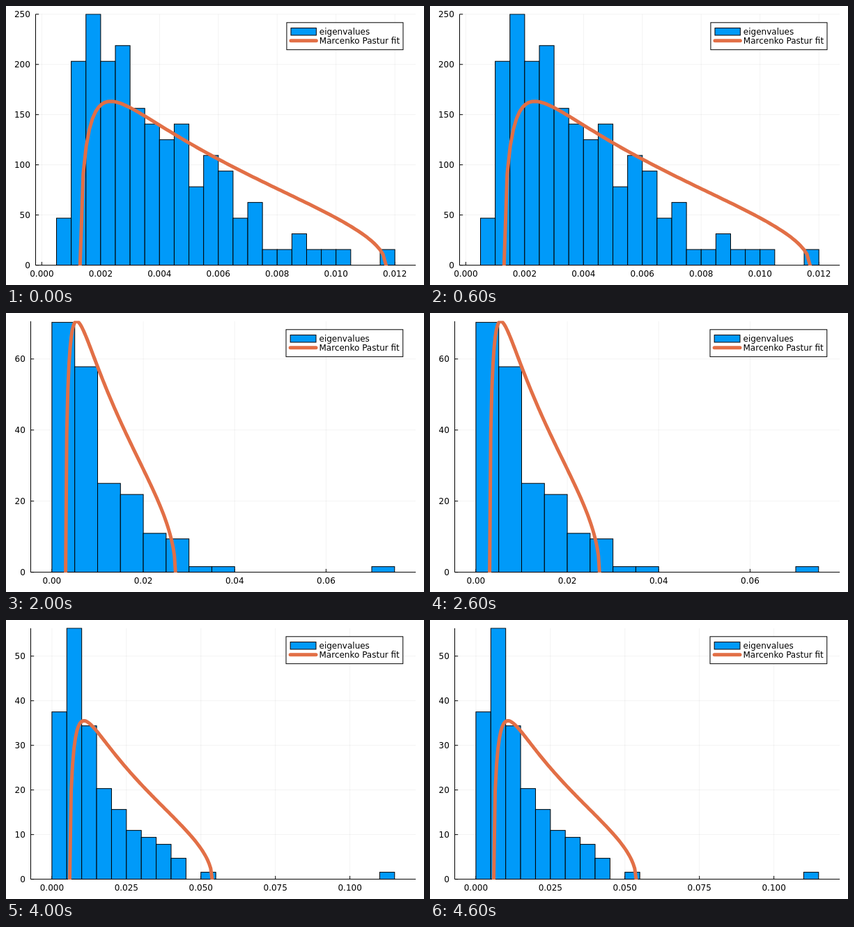
Write an HTML page that moves like this. It is 600 px wide and 400 px high and loops after 5000 ms.

```html
<!DOCTYPE html>
<html lang="en">
<head>
<meta charset="utf-8">
<title>Eigenvalue histograms</title>
<style>
  html, body { margin: 0; width: 100%; height: 100%; overflow: hidden; background: #fff; }
  svg { display: block; width: 600px; height: 400px; font: 12px "DejaVu Sans", sans-serif; }
</style>
</head>
<body>
<svg id="stage" viewBox="0 0 600 400"></svg>
<script>
const HOLD = 1000, SAMPLES = 128;
const TOP = 11.81, BOTTOM = 371.61, RIGHT = 588.19;
const BLUE = '#009af9', ORANGE = '#e26f46';

// counts are per bin, beginning at `start`; `variance` scales the fitted density
const charts = [
  { left: 42.5, start: 0.0005, bin: 0.0005, variance: 0.0052, xStep: 0.002, digits: 3, yStep: 50,
    counts: [3, 13, 16, 13, 14, 10, 9, 8, 9, 5, 7, 6, 3, 4, 1, 1, 2, 1, 1, 1, 0, 0, 1] },
  { left: 42.2, start: 0, bin: 0.002, variance: 0.00816, xStep: 0.01, digits: 2, yStep: 25,
    counts: [16, 32, 24, 14, 9, 8, 7, 4, 5, 3, 3, 1, 0, 0, 1, 0, 0, 0, 0, 0, 0, 0, 1] },
  { left: 35.5, start: 0, bin: 0.005, variance: 0.01202, xStep: 0.02, digits: 2, yStep: 20,
    counts: [45, 37, 16, 14, 7, 6, 1, 1, 0, 0, 0, 0, 0, 0, 1] },
  { left: 35.5, start: 0, bin: 0.005, variance: 0.016, xStep: 0.025, digits: 3, yStep: 10,
    counts: [34, 36, 20, 12, 10, 6, 5, 3, 0, 1, 0, 0, 0, 0, 0, 0, 0, 0, 1] },
  { left: 35.5, start: 0, bin: 0.005, variance: 0.0239, xStep: 0.025, digits: 3, yStep: 10,
    counts: [24, 36, 22, 13, 10, 7, 6, 5, 3, 0, 1, 0, 0, 0, 0, 0, 0, 0, 0, 0, 0, 0, 1] },
];

const line = (x1, y1, x2, y2, attrs = 'stroke="#000"') =>
  `<line x1="${x1}" y1="${y1}" x2="${x2}" y2="${y2}" ${attrs}/>`;
const box = (x, y, w, h, fill) =>
  `<rect x="${x}" y="${y}" width="${w}" height="${h}" fill="${fill}" stroke="#000"/>`;
const label = (x, y, text, anchor = 'start') =>
  `<text x="${x}" y="${y}" text-anchor="${anchor}">${text}</text>`;
const GRID = 'stroke="#000" stroke-width="0.5" stroke-opacity="0.1"';
const THICK = `fill="none" stroke="${ORANGE}" stroke-width="5" stroke-linecap="round" stroke-linejoin="round"`;

// Marchenko–Pastur density with aspect ratio 1/4
function fitPoints(variance, steps = 99) {
  const ratio = 0.25, root = Math.sqrt(ratio);
  const a = variance * (1 - root) ** 2, b = variance * (1 + root) ** 2;
  return Array.from({ length: steps + 1 }, (_, i) => {
    const x = a + (b - a) * i / steps;
    const area = Math.max(0, (b - x) * (x - a));
    return [x, Math.sqrt(area) / (2 * Math.PI * variance * ratio * x)];
  });
}

function legend(width) {
  const right = RIGHT - width / 30, left = right - 112.5 - width / 10;
  const top = TOP + (BOTTOM - TOP) / 30, row = 12.96;
  const keyX = left + width / 90, keyWidth = width / 15, textX = left + width * 0.086;
  return box(left, top, right - left, 3 * row, '#fff')
    + box(keyX, top + row * 0.6, keyWidth, row * 0.8, BLUE)
    + line(keyX, top + 2 * row, keyX + keyWidth, top + 2 * row, THICK)
    + label(textX, top + row + 4.3, 'eigenvalues')
    + label(textX, top + 2 * row + 4.3, 'Marcenko Pastur fit');
}

function chartMarkup({ left, start, bin, variance, xStep, digits, yStep, counts }) {
  const width = RIGHT - left;
  const span = width / 1.06 ** 2, barsLeft = left + (width - span) / 2;
  const xScale = span / (counts.length * bin);
  const points = fitPoints(variance);
  const heights = counts.map(n => n / (SAMPLES * bin));
  const yMax = Math.max(...heights, ...points.map(p => p[1]));
  const px = x => barsLeft + (x - start) * xScale;
  const py = y => BOTTOM - (BOTTOM - TOP) * y / yMax;

  let grid = '', axes = '', labels = '';
  for (let i = 0; px(i * xStep) <= RIGHT; i++) {
    const x = px(i * xStep);
    grid += line(x, TOP, x, BOTTOM, GRID);
    axes += line(x, BOTTOM, x, BOTTOM - 4.7);
    labels += label(x, 387.6, (i * xStep).toFixed(digits), 'middle');
  }
  for (let v = 0; v <= yMax + 1e-6; v += yStep) {
    const y = py(v);
    grid += line(left, y, RIGHT, y, GRID);
    axes += line(left, y, left + 4.7, y);
    labels += label(left - 7.7, y + 4.3, v, 'end');
  }
  axes += line(left, BOTTOM, RIGHT, BOTTOM) + line(left, TOP, left, BOTTOM);

  const bars = heights.map((h, i) =>
    h ? box(px(start + i * bin), py(h), bin * xScale, BOTTOM - py(h), BLUE) : '').join('');
  const curve = points.map(([x, y]) => `${px(x).toFixed(2)},${py(y).toFixed(2)}`).join(' ');

  return `<clipPath id="plot"><rect x="${left}" y="11.3" width="${width}" height="360.8"/></clipPath>`
    + grid + axes + labels
    + `<g clip-path="url(#plot)">${bars}<polyline points="${curve}" ${THICK}/></g>`
    + legend(width);
}

const stage = document.getElementById('stage');
const pages = charts.map(chartMarkup);
const began = performance.now();
let shown = -1;

function render(time) {
  const index = Math.floor(time / HOLD) % pages.length;
  if (index !== shown) stage.innerHTML = pages[shown = index];
}

function tick() {
  render(performance.now() - began);
  requestAnimationFrame(tick);
}
tick();
</script>
</body>
</html>
```
